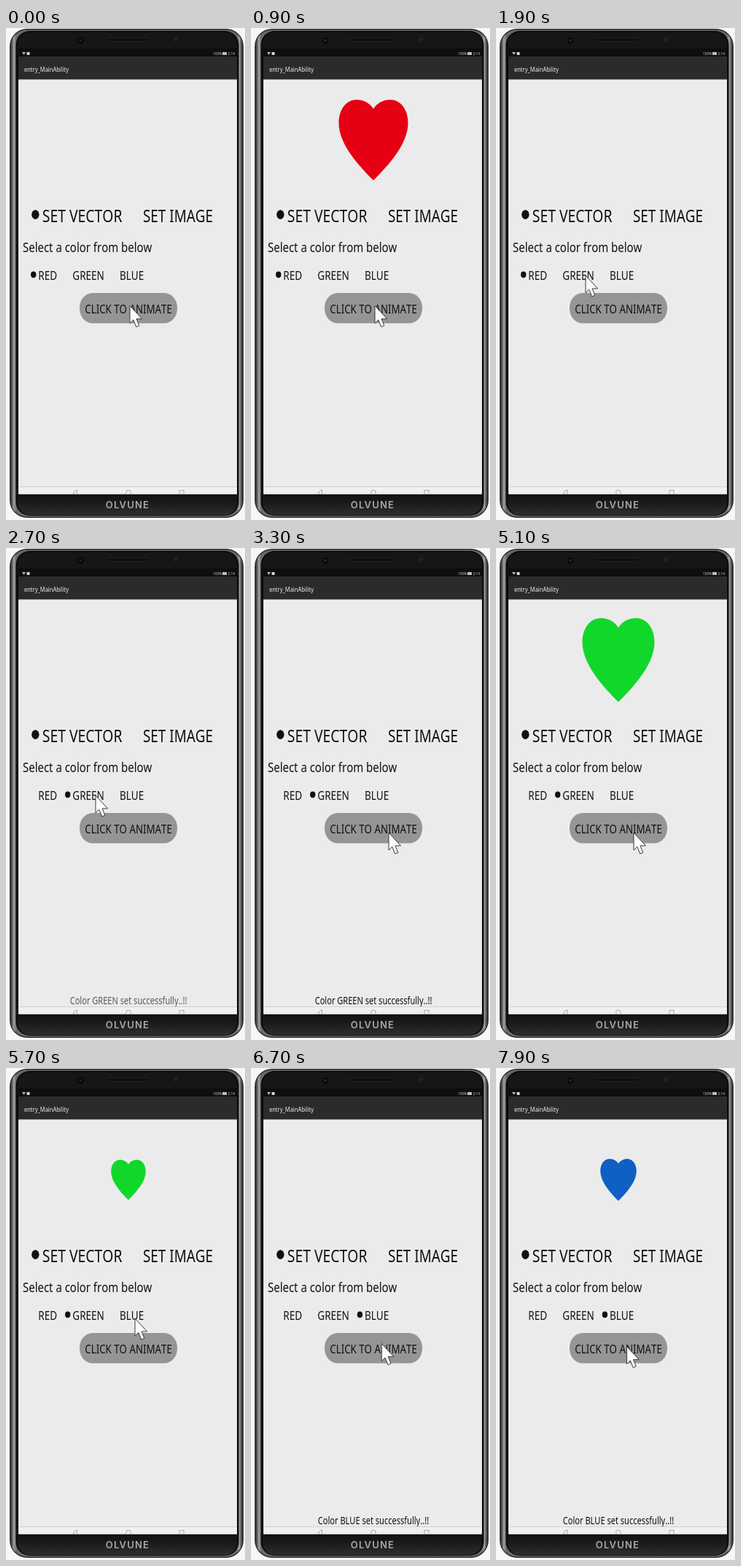
Write an HTML page with a canvas that moves like this. It is 328 px wide and 674 px high and loops after 8000 ms.

```html
<!DOCTYPE html>
<html lang="en">
<head>
<meta charset="utf-8">
<title>Heart animation</title>
<style>
  html, body { margin: 0; width: 100%; height: 100%; overflow: hidden; background: #f7f7f7; }
  canvas { display: block; width: 328px; height: 674px; }
</style>
</head>
<body>
<canvas id="stage"></canvas>
<script>
const W = 328, H = 674, LOOP = 8000, STEP = 100;
const SQUEEZE = 0.8; // the screen is narrower than its content was laid out for
const INK = '#111111';
const canvas = document.getElementById('stage');
const ctx = canvas.getContext('2d');
const dpr = window.devicePixelRatio || 1;
canvas.width = W * dpr;
canvas.height = H * dpr;

// Scale of one beat by time since the click
const BEAT = [[0, 0], [100, .24], [200, .5], [300, .8], [400, 1.08], [500, 1.02], [600, .96],
  [750, .985], [900, 1], [1200, 1], [1300, .93], [1400, .72], [1500, .48], [1600, 0]];

const HEARTS = [
  { start: 300, from: 400, fill: '#e60014' },
  { start: 4200, from: 4500, fill: '#12d72b' },
  { start: 7700, from: 7800, fill: '#0f5fc4' }
];

const MOVES = [
  { from: 1200, to: 1900, x: 123, y: 339 },
  { from: 2700, to: 3300, x: 189, y: 390 },
  { from: 5300, to: 5700, x: 177, y: 343 },
  { from: 6300, to: 6800, x: 179.5, y: 381.5 }
];

const COLORS = [
  { name: 'RED', x: 44.3, dot: 37.7, from: 0 },
  { name: 'GREEN', x: 91.3, dot: 84.7, from: 2500 },
  { name: 'BLUE', x: 156, dot: 149.4, from: 6300 }
];

const TOASTS = [
  { name: 'GREEN', x: 87.7, start: 2500, end: 5100 },
  { name: 'BLUE', x: 91.8, start: 6300, end: 9500 }
];

const clamp = v => Math.min(1, Math.max(0, v));
const ease = v => v * v * (3 - 2 * v);

function sample(keys, t) {
  const i = keys.findIndex(k => k[0] > t);
  if (i < 1) return 0;
  const [t0, a] = keys[i - 1], [t1, b] = keys[i];
  return a + (b - a) * (t - t0) / (t1 - t0);
}

function gradient(x0, y0, x1, y1, stops) {
  const g = ctx.createLinearGradient(x0, y0, x1, y1);
  stops.forEach(([at, color]) => g.addColorStop(at, color));
  return g;
}

function box(x, y, w, h, fill) {
  ctx.fillStyle = fill;
  ctx.fillRect(x, y, w, h);
}

function round(x, y, w, h, r, fill) {
  ctx.beginPath();
  ctx.roundRect(x, y, w, h, r);
  ctx.fillStyle = fill;
  ctx.fill();
}

function oval(x, y, rx, ry, fill) {
  ctx.beginPath();
  ctx.ellipse(x, y, rx, ry, 0, 0, Math.PI * 2);
  ctx.fillStyle = fill;
  ctx.fill();
}

function text(str, x, y, size, fill = INK) {
  ctx.save();
  ctx.translate(x, y);
  ctx.scale(SQUEEZE, 1);
  ctx.font = `${size}px "Noto Sans", sans-serif`;
  ctx.fontKerning = 'none';
  ctx.fillStyle = fill;
  ctx.fillText(str, 0, 0);
  ctx.restore();
}

function drawPhone() {
  box(0, 0, W, H, '#f7f7f7');
  const metal = gradient(5, 0, 326, 0, [
    [0, '#2b2b2b'], [.009, '#4a4949'], [.018, '#a3a1a1'], [.028, '#6a6868'],
    [.972, '#6a6868'], [.982, '#a3a1a1'], [.991, '#4a4949'], [1, '#2b2b2b']
  ]);
  round(5, 1, 321, 670, 24, '#2b2b2b');
  round(6, 2.5, 319, 667, 23, metal);
  round(13.5, 4, 306, 664, 19, '#0b0b0b');
  round(16, 6, 301, 33, [16, 16, 0, 0], '#161616');
  round(16, 638, 301, 29, [0, 0, 17, 17],
    gradient(0, 638, 0, 667, [[0, '#101010'], [.5, '#1d1d1d'], [1, '#2e2e2e']]));

  round(137, 13, 60, 6, 3, '#1f1f1f');
  round(138, 14, 58, 4, 2, '#0f0f0f');
  oval(102, 17, 4.5, 4.5, '#090909');
  oval(102, 17, 1.8, 1.8, '#242a35');
  oval(233, 15.5, 3, 3, '#262020');

  ctx.save();
  ctx.font = '600 13px Inter, sans-serif';
  ctx.letterSpacing = '1.2px';
  ctx.textAlign = 'center';
  ctx.fillStyle = '#a9a9a9';
  ctx.fillText('OLVUNE', 167, 658);
  ctx.restore();
}

function drawBars() {
  box(17, 28, 300, 11, '#0e0e0e');
  ctx.beginPath();
  ctx.moveTo(22, 33);
  ctx.lineTo(27, 33);
  ctx.lineTo(24.5, 37);
  ctx.fillStyle = '#b5b5b5';
  ctx.fill();
  box(28.5, 33, 4, 4, '#d5d5d5');
  text('100%', 284, 37, 6, '#c8c8c8');
  box(297, 33, 6, 4, '#bdbdbd');
  text('2:14', 304.5, 37, 6, '#c8c8c8');

  box(17, 39, 300, 32, '#2b2b2b');
  text('entry_MainAbility', 25, 60, 9.4, '#eeeeee');
  box(17, 70.5, 300, 568, '#ebebeb');
}

function drawNav() {
  box(17, 628, 300, 1, '#d2d2d2');
  box(17, 629, 300, 9.5, '#f0f0f0');
  ctx.save();
  ctx.beginPath();
  ctx.rect(17, 629, 300, 9.5);
  ctx.clip();
  ctx.strokeStyle = '#9a9a9a';
  ctx.lineWidth = 0.8;
  ctx.beginPath();
  ctx.moveTo(97.5, 632.5);
  ctx.lineTo(92, 636.5);
  ctx.lineTo(97.5, 640.5);
  ctx.closePath();
  ctx.stroke();
  ctx.beginPath();
  ctx.ellipse(168, 637, 3.4, 4, 0, 0, Math.PI * 2);
  ctx.stroke();
  ctx.strokeRect(238, 633.5, 6, 7);
  ctx.restore();
}

function drawControls(t) {
  oval(40.3, 255.6, 5.2, 6.3, INK);
  text('SET VECTOR', 49.8, 265.7, 24.2);
  text('SET IMAGE', 188, 265.7, 23.6);
  text('Select a color from below', 23, 307, 18.7);

  COLORS.forEach(c => text(c.name, c.x, 345, 16.9));
  const chosen = COLORS.filter(c => t >= c.from).pop();
  oval(chosen.dot, 337.8, 3.7, 4.4, INK);

  round(101, 363, 134, 41.5, { x: 18, y: 20 }, '#969594');
  text('CLICK TO ANIMATE', 108.3, 391, 16.6);
}

function drawHeart(t) {
  const beat = HEARTS.find(h => t >= h.from && t < h.start + 1600);
  if (!beat) return;
  const s = sample(BEAT, t - beat.start);
  ctx.save();
  ctx.translate(168, 153);
  ctx.scale(s, s);
  ctx.beginPath();
  ctx.moveTo(0, -44);
  ctx.bezierCurveTo(5, -52, 14, -57, 24, -57);
  ctx.bezierCurveTo(39, -57, 49.5, -43, 49.5, -24);
  ctx.bezierCurveTo(49.5, 6, 22, 36, 0, 58);
  ctx.bezierCurveTo(-22, 36, -49.5, 6, -49.5, -24);
  ctx.bezierCurveTo(-49.5, -43, -39, -57, -24, -57);
  ctx.bezierCurveTo(-14, -57, -5, -52, 0, -44);
  ctx.fillStyle = beat.fill;
  ctx.fill();
  ctx.restore();
}

function drawToast(t) {
  for (const { name, x, start, end } of TOASTS) {
    ctx.globalAlpha = Math.min(clamp((t - start) / 300), clamp((end - t) / 400));
    text(`Color ${name} set successfully..!!`, x, 625, 13.8);
  }
  ctx.globalAlpha = 1;
}

function drawCursor(t) {
  let x = 170, y = 380.5;
  for (const m of MOVES) {
    const k = ease(clamp((t - m.from) / (m.to - m.from)));
    x += (m.x - x) * k;
    y += (m.y - y) * k;
  }
  ctx.save();
  ctx.translate(x, y);
  ctx.beginPath();
  [[0, 0], [0, 24], [4.8, 19.3], [8.7, 29], [12.8, 27.2], [9, 18], [16.5, 17.8]]
    .forEach(p => ctx.lineTo(...p));
  ctx.closePath();
  ctx.fillStyle = '#fcfcfc';
  ctx.fill();
  ctx.strokeStyle = '#3a3a3a';
  ctx.stroke();
  ctx.restore();
}

function draw(t) {
  ctx.setTransform(dpr, 0, 0, dpr, 0, 0);
  drawPhone();
  drawBars();
  drawHeart(t);
  drawControls(t);
  drawToast(t);
  drawNav();
  drawCursor(t);
}

let origin;
function tick(now) {
  origin ??= now;
  draw(Math.floor((now - origin) % LOOP / STEP) * STEP);
  requestAnimationFrame(tick);
}
draw(0);
requestAnimationFrame(tick);
</script>
</body>
</html>
```
